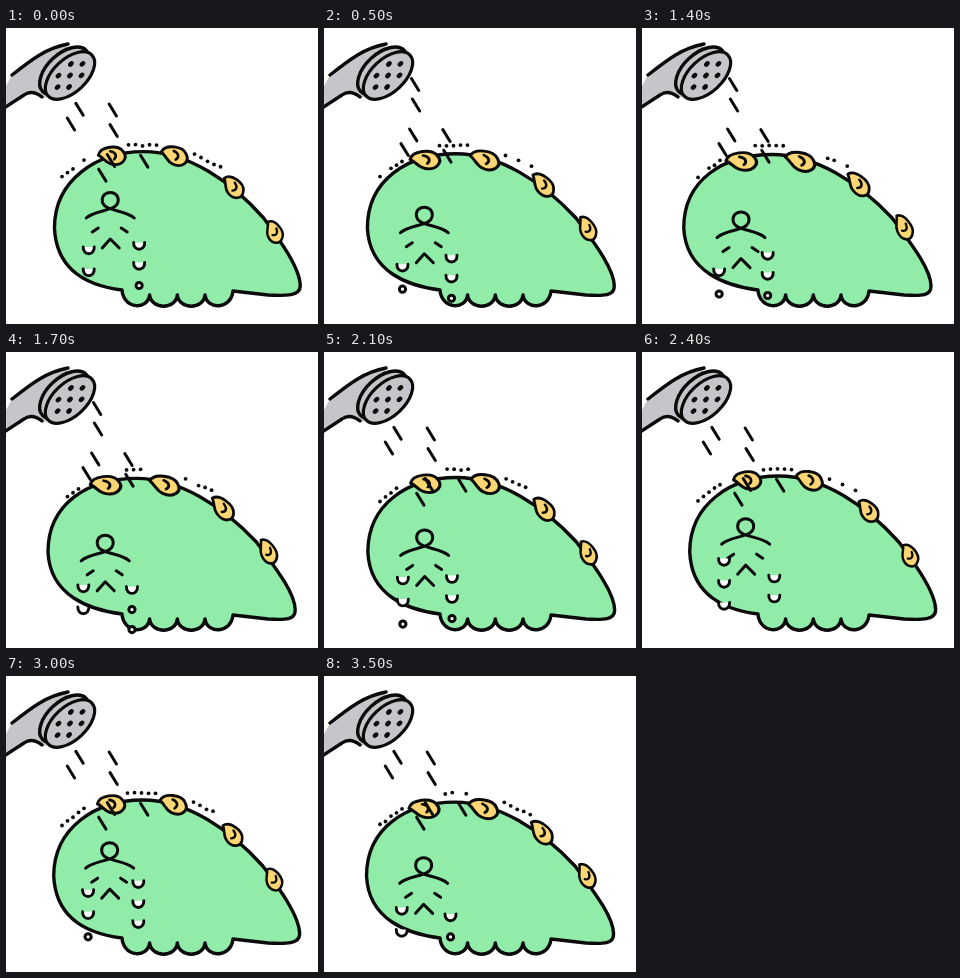
Write an HTML page with a canvas that moves like this. It is 312x296 px and loops after 3600 ms.

```html
<!DOCTYPE html>
<html>
<head>
<meta charset="utf-8">
<style>
  html, body { margin: 0; width: 100%; height: 100%; overflow: hidden; background: #fff; }
  canvas { display: block; }
</style>
</head>
<body>
<canvas id="stage" width="312" height="296"></canvas>
<script>
const ctx = document.getElementById('stage').getContext('2d');
const LOOP = 3600, STEP = 100;
const INK = '#0b0b0b', GREEN = '#91eca9', GRAY = '#c6c5c9', YELLOW = '#fcd673';

const mod = (a, b) => ((a % b) + b) % b;
const random = n => mod(Math.sin(n * 127.1 + 11.7) * 43758.5453, 1);

// Body lift: 1 while sitting up, sinking to -1 between sobs
function lift(t) {
  const period = 2850, peak = 2700;
  const away = mod(t - peak + period / 2, period) - period / 2;
  return 1.92 / (1 + (away / 500) ** 4) - 1;
}

function draw(d, fill, width = 3.4) {
  const path = new Path2D(d);
  if (fill) { ctx.fillStyle = fill; ctx.fill(path); }
  ctx.lineWidth = width;
  if (width) ctx.stroke(path);
}

function at(x, y, angle, paint, sx = 1, sy = sx) {
  ctx.save();
  ctx.translate(x, y);
  ctx.rotate(angle);
  ctx.scale(sx, sy);
  paint();
  ctx.restore();
}

function oval(x, y, rx, ry, fill, width) {
  ctx.beginPath();
  ctx.ellipse(x, y, rx, ry, 0, 0, 7);
  ctx.fillStyle = fill;
  ctx.fill();
  ctx.lineWidth = width;
  if (width) ctx.stroke();
}

function shower() {
  draw('M0 58 L6 47 C25 32 40 20 62 16 L40 70 Q26 61 18 67 L0 79Z', GRAY, 0);
  draw('M6 47 C25 32 40 20 62 16 M-2 80 L18 67 Q26 61 36 69');
  const tilt = -.75;
  at(58.5, 43, tilt, () => oval(0, 0, 30, 17, GRAY, 3.4));
  at(64, 47.5, tilt, () => {
    oval(0, 0, 30, 16.5, GRAY, 3.2);
    oval(0, 0, 3.2, 2.3, INK, 0);
    for (let a = 0; a < 6; a++)
      oval(17 * Math.cos(a * Math.PI / 3), 9 * Math.sin(a * Math.PI / 3), 3.2, 2.3, INK, 0);
  });
}

// Parallel streams of dashes, dropping half a gap per step
function water(step) {
  const gap = 60, reach = 98, dx = .523, dy = .852;
  for (const [side, offset] of [[5, 16], [20, 8], [38, 44], [48, 26]]) {
    const first = mod(offset + step * gap / 2 + 5, gap) - 5;
    for (let s = first; s < reach; s += gap) {
      const x = 52.3 + dy * side + dx * s, y = 85 - dx * side + dy * s;
      draw(`M${x - 7 * dx} ${y - 7 * dy} l${14 * dx} ${14 * dy}`, null, 3);
    }
  }
}

function body(p) {
  const l = 45.2 + 3.6 * p, r = 291.7 + 2.8 * p, top = 125 - 1.5 * p;
  let d = `M116 262 C84 258 ${l + 2} 244 ${l} 200 C${l} 152 ${86 + 5 * p} ${top} ${134 + 4 * p} ${top}
    C${178 + 5 * p} ${top} ${221 + 5 * p} 154 ${254 + 4 * p} 190
    C${270 + 4 * p} 212 ${r} 240 ${r} 258 C${r} 268 280 268 262 267 L227 263`;
  for (let x = 199; x > 110; x -= 27.7) d += `C${x + 26} 282 ${x + 2} 282 ${x} ${x < 130 ? 262 : 267}`;
  draw(d + 'Z', GREEN);
}

function curls(p) {
  const spots = [
    [103 + 3.5 * p, 131 - 3 * p, 0, 1], [163.5 + 5.5 * p, 131 - 3 * p, .25, 1],
    [221.5 + 6 * p, 158 + 1.5 * p, .75, .92], [264.5 + 3.5 * p, 202 + 2.5 * p, 1, .86]
  ];
  for (const [x, y, angle, size] of spots) at(x, y, angle, () => {
    draw('M-14 -1 C-12 -10 6 -12 11 -5 C17 2 10 10 0 8 C-6 7 -8 2 -14 -1Z', YELLOW, 2.9);
    draw('M-2 -5 C4 -4 5 0 2 3', null, 2.6);
  }, size * (1.05 - .07 * p), size);
}

// Three short rows of flickering droplets above the back
function steam(p, seed) {
  for (let i = 0; i < 5; i++) {
    const rows = [
      [56 + i * 5.5, 150 - i * 4], [118 + 5 * p + i * 7, 118.5], [184 + 5 * p + i * 6.5, 128 + i * 3]
    ];
    rows.forEach(([x, y], row) => {
      const chance = random(seed * 31 + row * 7 + i);
      if (chance > .2) oval(x, y - chance * 2, 1.9, 1.9, INK, 0);
    });
  }
}

function face(x, y) {
  at(x, y, 0, () => {
    draw('M-24 -25 C-14 -34 8 -31 8 -43 C8 -53 -8 -53 -8 -43 C-8 -31 14 -34 24 -25', null, 3);
    draw('M-18 -11 L-12 -15 M11 -15 L17 -11 M-8 5 L0 -4 L9 5', null, 3);
  });
}

// Cups roll down the cheek and turn into rings below the floor line
function tears(x, y, cycle, gap, floor) {
  for (let rise = gap * (cycle % 1) - 9.5; rise < 44; rise += gap) {
    if (y + rise > floor) oval(x, y + rise, 3.1, 3.1, '#fff', 3);
    else at(x, y + rise, 0, () => draw('M-5.5 -3 C-6 6 6 6 5.5 -3', '#fff', 2.9));
  }
}

function frame(now) {
  const t = Math.floor(now % LOOP / STEP) * STEP;
  const p = lift(t), y = 224.5 - 10.5 * p;
  ctx.fillStyle = '#fff';
  ctx.fillRect(0, 0, 312, 296);
  ctx.strokeStyle = INK;
  ctx.lineCap = ctx.lineJoin = 'round';
  shower();
  body(p);
  curls(p);
  steam(p, t / STEP);
  water(Math.floor(t / 145));
  face(101.7 + 2.8 * p, y);
  tears(80 + 3 * p, y, .75 + t / 450, 22, 258);
  tears(129.5 + 4 * p, y, .6 + t / 555, 20, 256);
  requestAnimationFrame(() => frame(performance.now() - began));
}

const began = performance.now();
frame(0);
</script>
</body>
</html>
```
